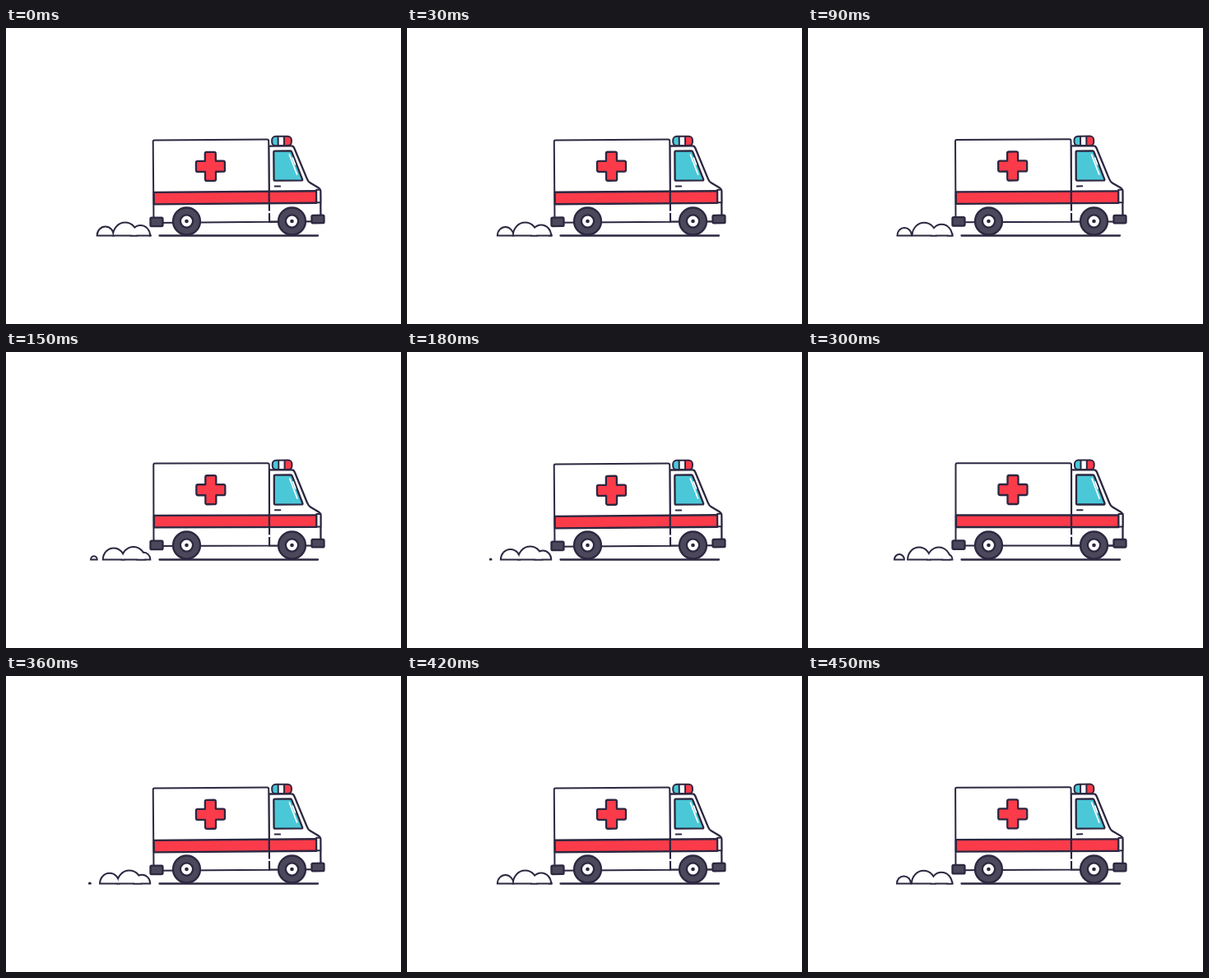
An HTML page without scripts that plays this animation: 480 by 360 pixels, repeating every 480 ms.

```html
<!DOCTYPE html>
<html lang="en">
<head>
<meta charset="utf-8">
<title>Ambulance</title>
<style>
  @property --phase { syntax: "<number>"; inherits: true; initial-value: 0; }

  html, body { margin: 0; width: 100%; height: 100%; overflow: hidden; background: #fff; }

  svg {
    --ink: #2d2740;
    --rubber: #4c485b;
    --red: #fb3b4a;
    --glass: #4bc8d8;
    display: block;
    width: 100%;
    height: 100%;
    animation: drive 480ms infinite;
  }

  /* One unit of phase is one puff of smoke and one rock of the body. */
  @keyframes drive {
    0%     { --phase: .05;  animation-timing-function: steps(3); }
    18.75% { --phase: .2;   animation-timing-function: steps(2); }
    31.25% { --phase: .63;  animation-timing-function: steps(3); }
    50%    { --phase: 1.28; animation-timing-function: steps(2); }
    62.5%  { --phase: 1.46; animation-timing-function: steps(2); }
    75%    { --phase: 1.84; animation-timing-function: steps(3); }
    93.75% { --phase: 2.23; animation-timing-function: steps(1); }
    100%   { --phase: 3.05; }
  }

  .line { fill: none; stroke: var(--ink); stroke-width: 2.3; stroke-linecap: round; stroke-linejoin: round; }
  .fine { stroke-width: 2; }
  .white { fill: #fff; }
  .red { fill: var(--red); }
  .blue { fill: var(--glass); }
  .dark { fill: var(--rubber); }
  .ink { fill: var(--ink); }
  .shine { fill: none; stroke: #fff; stroke-width: 1.7; stroke-linecap: round; }

  .body {
    transform-origin: 347px 236px;
    transform: rotate(calc(-.26deg * (1 + cos((var(--phase) + .04) * 1turn))));
  }

  .puff {
    --age: calc(var(--phase) + var(--i));
    --d: calc(var(--age) - .95);
    --r: calc(16px - 4.2px * var(--d) * var(--d));
    cx: min(170px - 24px * var(--age), 176px - var(--r));
    cy: 252.5px;
    rx: max(0px, .93 * var(--r) + var(--edge));
    ry: max(0px, var(--r) + var(--edge));
  }
  .outline { --edge: 1px; fill: var(--ink); }
  .filling { --edge: -1px; fill: #fff; }

  .wisp { animation: wisp 480ms step-end infinite; }
  @keyframes wisp { 0% { opacity: 1; } 6.25%, 100% { opacity: 0; } }
</style>
</head>
<body>
<svg viewBox="0 0 480 360">
  <defs>
    <clipPath id="above-ground"><path d="M80 220H178V253.5H80z"/></clipPath>
    <clipPath id="above-base"><path d="M80 220H178V251.5H80z"/></clipPath>
    <clipPath id="lamp"><rect x="323.5" y="131.5" width="24" height="11.5" rx="4.5"/></clipPath>
    <g id="puffs">
      <ellipse class="puff" style="--i:2"/>
      <ellipse class="puff" style="--i:1"/>
      <ellipse class="puff" style="--i:0"/>
      <ellipse class="puff" style="--i:-1"/>
      <ellipse class="puff" style="--i:-2"/>
      <ellipse class="puff" style="--i:-3"/>
      <ellipse class="puff" style="--i:-4"/>
    </g>
    <g id="wheel">
      <circle class="line dark" r="16.5"/>
      <circle class="line white" r="7.6"/>
      <circle class="ink" r="2.3"/>
    </g>
  </defs>

  <rect class="white" width="480" height="360"/>

  <!-- Smoke -->
  <g clip-path="url(#above-ground)"><use href="#puffs" class="outline"/></g>
  <g clip-path="url(#above-base)"><use href="#puffs" class="filling"/></g>
  <ellipse class="line fine white wisp" cx="98" cy="251" rx="3.3" ry="1.8"/>

  <path class="line" d="M186.5 252.5H379"/>

  <g class="body">
    <!-- Lamp -->
    <g clip-path="url(#lamp)">
      <path class="blue" d="M323 131h8v13h-8z"/>
      <path class="white" d="M331 131h8v13h-8z"/>
      <path class="red" d="M339 131h9v13h-9z"/>
    </g>
    <path class="line fine" d="M331.5 132V142M338.8 132V142"/>
    <rect class="line fine" x="324" y="131.6" width="23.7" height="11.4" rx="4.5"/>

    <!-- Cab and box -->
    <path class="line white" d="M320 143.3H347.5Q350 143.3 351 146L366 183Q367.5 187 370 188.5L380 194.5Q382.5 196 382.5 198.5V235.5H320z"/>
    <path class="line fine white" d="M179.5 235.5V137Q179.5 135.2 181 135.2H318Q320 135.2 320 137V235.5z"/>
    <path class="line red" d="M180 198.5H377.5V213H180z"/>
    <path class="line fine white" d="M377.5 197H382.5V212.5H377.5z"/>
    <path class="line" d="M320 198V212.5"/>
    <path d="M320 222.3v2.6" stroke="#fff" stroke-width="3"/>

    <!-- Window and handle -->
    <path class="line blue" d="M327 149.5H346Q347.5 149.5 348 151L360.5 184Q361 185.5 359.5 185.5H327.5Q326 185.5 326 184V150.5Q326 149.5 327 149.5z"/>
    <path class="shine" d="M345 154L354 178M349 158L352 166"/>
    <path class="line fine" d="M327 192.3H333.5"/>

    <!-- Cross -->
    <path class="line red" d="M244.5 150H253.5Q255.5 150 255.5 152V161H264.5Q266.5 161 266.5 163V172Q266.5 174 264.5 174H255.5V183Q255.5 185 253.5 185H244.5Q242.5 185 242.5 183V174H233.5Q231.5 174 231.5 172V163Q231.5 161 233.5 161H242.5V152Q242.5 150 244.5 150z"/>

    <!-- Bumpers -->
    <rect class="line dark" x="175.5" y="229.3" width="15" height="10.5" rx="1.5"/>
    <rect class="line dark" x="371.5" y="228" width="15" height="9.5" rx="1.5"/>
  </g>

  <use href="#wheel" x="219.5" y="235"/>
  <use href="#wheel" x="347.5" y="235"/>
</svg>
</body>
</html>
```
